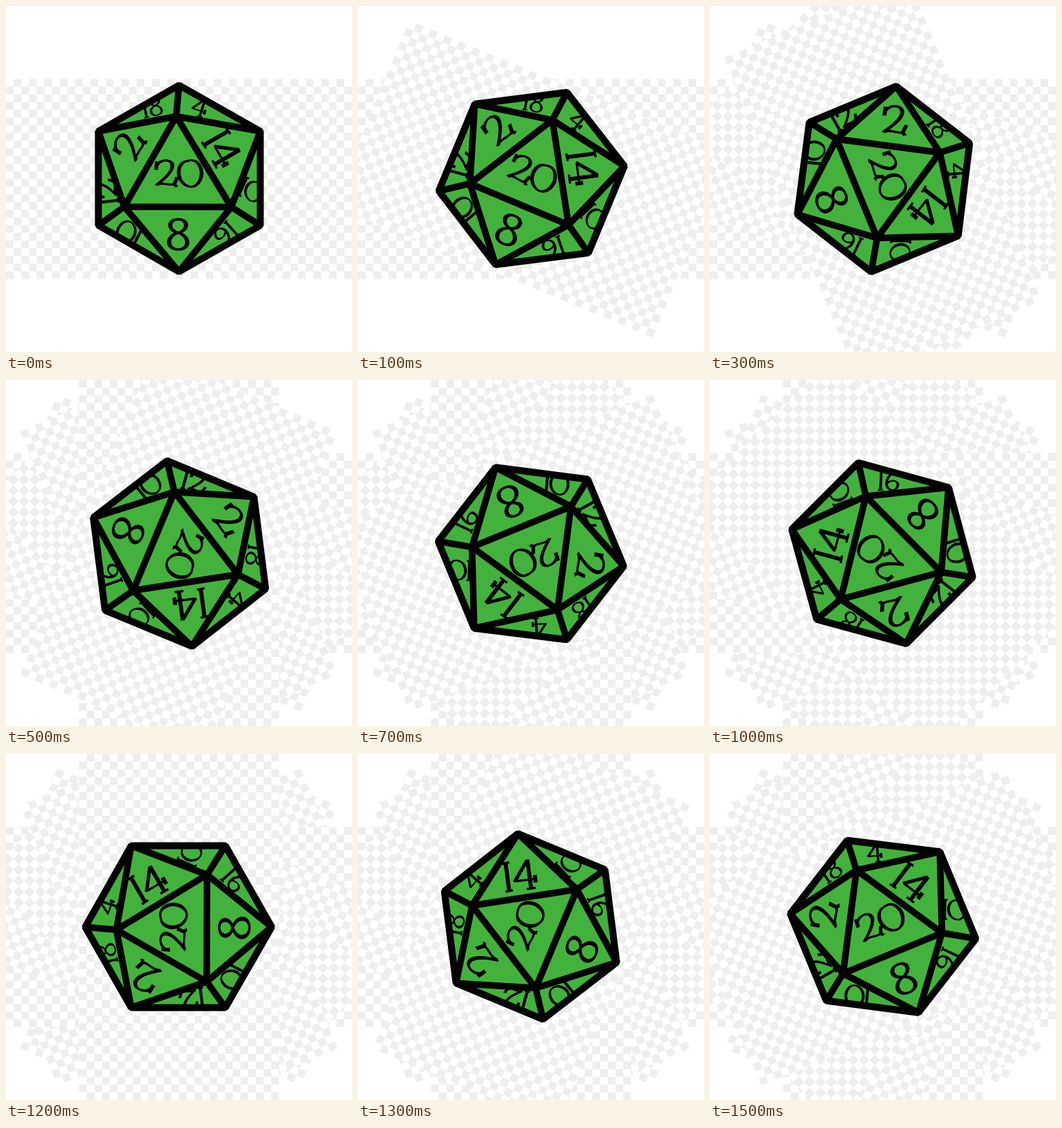
Animation, 500 px wide and 500 px high, one loop 1600 ms. Source, as an HTML page with a canvas:

```html
<!DOCTYPE html>
<html lang="en">
<head>
<meta charset="utf-8">
<title>Spinning d20</title>
<style>
  html, body { margin: 0; height: 100%; overflow: hidden; background: #fff; }
  canvas { display: block; }
</style>
</head>
<body>
<canvas id="stage" width="500" height="500"></canvas>
<script>
const ctx = document.getElementById('stage').getContext('2d');
const STEPS = 16, STEP_MS = 100;
const COLS = 45, ROWS = 26, CELL = 500 / COLS;
const TOP = 250 - ROWS * CELL / 2;

const checker = new Path2D();
for (let row = 0; row < ROWS; row++)
  for (let col = 1 - row % 2; col < COLS; col += 2)
    checker.rect(col * CELL, TOP + row * CELL, CELL, CELL);

const outline = new Path2D('M250 114.5L367.5 181V317L250 384L133.5 317V181Z');
const edges = new Path2D(
  'M246 159.5L325.5 290.5L171 290ZM250 114.5L246 159.5L133.5 181L171 290L133.5 317' +
  'M246 159.5L367.5 181L325.5 290.5L367.5 317M171 290L250 384L325.5 290.5');

// Hand-lettered digits, 40 units tall and centred on the origin
const glyphs = {
  0: 'M-3 -18C-14 -17 -18 -5 -15 5S-2 21 6 18S19 2 15 -8S5 -20 -3 -18Z',
  1: 'M0 -18V18M-5 -18L5 -19M-5 19L5 18',
  2: 'M-14 -5L-13 -17M-13 -12C-5 -22 11 -20 9 -9C7 0 -4 9 -14 17C-5 11 4 18 12 15L16 5M12 15L15 19',
  4: 'M6 18V-19L-14 7H14M0 19H12M13 2V12',
  6: 'M8 -18C-6 -16 -13 -4 -11 8S8 21 11 10S0 -5 -10 4',
  8: 'M0 -2C-14 -5 -13 -19 0 -19S13 -5 0 -2C-16 2 -15 19 0 19S15 2 0 -2Z'
};
// A flat pen: strokes are NIB times wider across than down
const NIB = 1.75, PEN = 3;
for (const digit in glyphs) {
  const path = new Path2D();
  path.addPath(new Path2D(glyphs[digit]), new DOMMatrix([1 / NIB, 0, 0, 1, 0, 0]));
  glyphs[digit] = path;
}
const advance = digit => digit === '1' ? 12 : 34;

// number, x, y, degrees, scale
const labels = [
  ['20', 248.5, 242, 0, 1.02],
  ['8', 249, 330, 0, 1.15],
  ['2', 178, 202, -63, 1.1],
  ['14', 313, 207, 60, 1.1],
  ['18', 212, 146, -12, 0.68],
  ['4', 280, 146, 18, 0.7],
  ['12', 145.5, 269, -97, 0.8],
  ['10', 178.5, 328, -152, 0.78],
  ['16', 317, 330, 138, 0.72],
  ['10', 354, 266, 24, 0.76]
];

function drawLabel([text, x, y, degrees, scale]) {
  ctx.save();
  ctx.translate(x, y);
  ctx.rotate(degrees * Math.PI / 180);
  ctx.scale(scale * NIB, scale);
  ctx.lineWidth = PEN;
  let left = -[...text].reduce((sum, digit) => sum + advance(digit), 0) / 2;
  for (const digit of text) {
    const half = advance(digit) / 2;
    ctx.translate((left + half) / NIB, 0);
    ctx.stroke(glyphs[digit]);
    left = half;
  }
  ctx.restore();
}

function drawDie() {
  ctx.fillStyle = '#43b23c';
  ctx.strokeStyle = '#000';
  ctx.fill(outline);
  ctx.save();
  ctx.clip(outline);
  labels.forEach(drawLabel);
  ctx.restore();
  ctx.lineWidth = 10;
  ctx.stroke(outline);
  ctx.lineWidth = 9.5;
  ctx.stroke(edges);
}

function drawBand() {
  ctx.fillStyle = '#fff';
  ctx.fillRect(0, TOP, 500, ROWS * CELL);
  ctx.fillStyle = '#eee';
  ctx.fill(checker);
}

// Each turned band stays behind as a trail until the loop restarts
function drawStep(last) {
  ctx.clearRect(0, 0, 500, 500);
  ctx.lineJoin = 'bevel';
  for (let step = 0; step <= last; step++) {
    ctx.save();
    ctx.translate(250, 250);
    ctx.rotate(step / STEPS * 2 * Math.PI);
    ctx.translate(-250, -250);
    drawBand();
    if (step === last) drawDie();
    ctx.restore();
  }
}

let shown = -1;
function tick() {
  const step = Math.floor(performance.now() / STEP_MS) % STEPS;
  if (step !== shown) drawStep(shown = step);
  requestAnimationFrame(tick);
}
tick();
</script>
</body>
</html>
```
